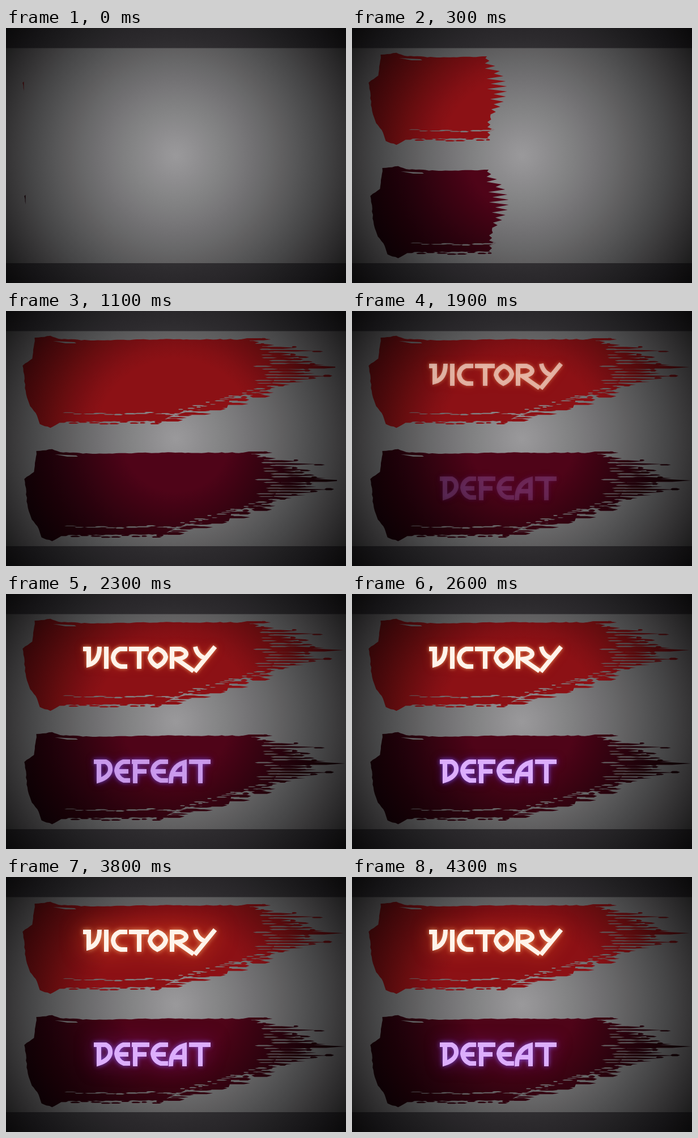
An HTML page with a canvas for the animation above (4.4 s loop, 600 px wide and 450 px high).

```html
<!DOCTYPE html>
<html lang="en">
<head>
<meta charset="utf-8">
<title>Victory / Defeat</title>
<style>
  html, body { margin: 0; width: 100%; height: 100%; overflow: hidden; background: #111; }
  canvas { display: block; }
</style>
</head>
<body>
<canvas id="stage" width="600" height="450" role="img" aria-label="VICTORY, DEFEAT"></canvas>
<script>
const ctx = document.getElementById('stage').getContext('2d');
const LOOP = 4400;
const RADIUS = 375;
const clamp = v => Math.max(0, Math.min(1, v));

let seed = 7;
function rand(a, b) {
  seed = (seed * 16807) % 2147483647;
  return a + (b - a) * seed / 2147483647;
}

// Each surface: colour in full light, how fast it darkens, brightest share of the colour
const PANEL = { rgb: [154, 153, 155], power: 1, cap: 1 };
const BARS = { rgb: [78, 75, 80], power: 1, cap: 1 };
const RED = { rgb: [225, 28, 34], power: 1.4, cap: .62 };
const WINE = { rgb: [120, 6, 37], power: 2.2, cap: .66 };

// Vignette around the stage centre, for drawing shifted by dx, dy
function vignette({ rgb, power, cap }, dx = 0, dy = 0) {
  const x = 300 - dx, y = 225 - dy;
  const g = ctx.createRadialGradient(x, y, 0, x, y, RADIUS);
  for (let u = 0; u <= 1; u += 1 / 16) {
    const light = 1 - .88 * u + .25 * u * (1 - u);
    const share = Math.min(cap, light ** power);
    g.addColorStop(u, `rgb(${rgb.map(c => c * share)})`);
  }
  return g;
}

// Tapered horizontal bristle mark
function addMark(path, x, y, length, h) {
  path.moveTo(x, y);
  path.lineTo(x + length * .2, y - h / 2);
  path.lineTo(x + length * .65, y - h / 2);
  path.lineTo(x + length, y);
  path.lineTo(x + length * .75, y + h / 2);
  path.lineTo(x + length * .15, y + h / 2);
  path.closePath();
}

// Closed outline through the points, with small bumps along each side
function addRough(path, points, bump) {
  points.forEach(([x0, y0], i) => {
    const [x1, y1] = points[(i + 1) % points.length];
    const parts = Math.ceil(Math.hypot(x1 - x0, y1 - y0) / 6);
    for (let k = 0; k < parts; k++) {
      const x = x0 + (x1 - x0) * k / parts + rand(-bump, bump);
      const y = y0 + (y1 - y0) * k / parts + rand(-bump, bump);
      i + k ? path.lineTo(x, y) : path.moveTo(x, y);
    }
  });
  path.closePath();
}

const brush = new Path2D();
const slits = new Path2D('M83 53 121 55 124 57 105 57Z');

addRough(brush, [[30, 96], [46, 84], [51, 47], [78, 44], [92, 49], [150, 52], [260, 50], [425, 50],
  [478, 75], [482, 105], [465, 138], [395, 154], [390, 171], [312, 177], [272, 194], [97, 196],
  [78, 206], [60, 200], [52, 180], [42, 168], [35, 147]], .7);

// Bristles of the tail, longest in the middle
for (let y = 50; y < 148; y += 5) {
  const tip = 592 - .05 * (y - 98) ** 2 - rand(0, 65);
  addMark(brush, 415, y, tip - 415, rand(3, 5.5));
  addMark(brush, tip - rand(5, 30), y + rand(-2, 2), rand(8, 22), rand(2, 4));
  addMark(slits, rand(435, 470), y + 2.5, rand(20, 45), rand(1, 2.2));
}
addMark(brush, 460, 99, 136, 5);

// Crumbs along the rising lower edge
for (let x = 262; x < 440; x += 8) {
  const y = 195 - (x - 262) * .28;
  addMark(brush, x, y + rand(-4, 3), rand(12, 46), rand(2, 5));
  addMark(slits, x + 10, y - rand(5, 14), rand(8, 22), rand(1, 2));
}
// Dry streaks near the straight lower edge
for (let x = 100; x < 265; x += 18) {
  addMark(slits, x, rand(179, 183), rand(12, 32), rand(1, 2.5));
  addMark(brush, x - 8, rand(195, 199), rand(10, 22), 2.5);
}

// Spiky wipe edge: height and distance behind the front
const spikes = [];
for (let y = 40; y < 212; y += 9) {
  spikes.push([y, Math.min(70, .025 * (y - 108) ** 2)], [y + 4.5, rand(45, 82)]);
}

function drawBrush(t, surface, dx, dy) {
  const front = t < 1400 ? 31.5 + 568 * (1 - Math.exp(-((t / 456) ** 1.4))) : 700;
  const depth = t < 600 ? t / 600 : clamp((1100 - t) / 500);
  ctx.save();
  ctx.translate(dx, dy);
  ctx.beginPath();
  ctx.moveTo(-5, 0);
  ctx.lineTo(front - depth * 70, 0);
  for (const [y, back] of spikes) ctx.lineTo(front - depth * back, y);
  ctx.lineTo(-5, 220);
  ctx.clip();
  ctx.fillStyle = vignette(surface, dx, dy);
  ctx.fill(brush);
  ctx.fillStyle = vignette(PANEL, dx, dy);
  ctx.fill(slits);
  ctx.restore();
}

// Angular lettering
const VICTORY = new Path2D(`M136 97H146V125Q165 120 165 93 M177 93V132
  M214 97H201Q190 101 189 112Q190 125 203 128H214 M217 97H252 M235 97V132
  M268 97Q255 103 254 113Q257 123 267 128Q281 121 282 111Q280 101 268 97Z
  M293 132V97H308Q318 100 318 106Q317 113 301 115L331 136 M334 93Q337 109 353 114 M369 93L333 137`);
const DEFEAT = new Path2D(`M155 296H176Q185 300 184 311Q182 323 164 329V296
  M219 296H207Q196 300 195 312Q197 325 208 329H219 M196 313H216
  M222 296H253 M228 296V334 M228 313H248
  M286 296H272Q260 300 259 312Q261 325 273 329H286 M260 313H282
  M291 334Q290 304 315 297V334 M291 318H316 M323 296H361 M343 296V334`);

function drawWord(path, alpha, color, glows) {
  const away = 2000;
  ctx.save();
  ctx.globalAlpha = alpha;
  ctx.lineWidth = 8;
  ctx.strokeStyle = color;
  // Only the shadow of a word drawn off the stage is seen
  ctx.translate(-away, 0);
  ctx.shadowOffsetX = away;
  for (const [tint, blur] of glows) {
    ctx.shadowColor = tint;
    ctx.shadowBlur = blur;
    ctx.stroke(path);
  }
  ctx.translate(away, 0);
  ctx.shadowColor = 'transparent';
  ctx.stroke(path);
  ctx.restore();
}

function draw(t) {
  ctx.fillStyle = vignette(BARS);
  ctx.fillRect(0, 0, 600, 450);
  ctx.fillStyle = vignette(PANEL);
  ctx.fillRect(0, 35.5, 600, 379.5);
  drawBrush(t, RED, 0, 0);
  drawBrush(t, WINE, 3, 200);

  const pulse = t < 2600 ? 0 : (1 - Math.cos((t - 2600) / 2400 * 2 * Math.PI)) / 2;
  drawWord(VICTORY, clamp((t - 1600) / 500), '#fff3ea', [
    [`rgba(255,90,30,${.3 + .5 * pulse})`, 18 + 22 * pulse],
    ['rgba(255,175,110,.8)', 6 + 4 * pulse]]);
  drawWord(DEFEAT, clamp((t - 1800) / 600), '#dcaefc', [
    [`rgba(${90 + 70 * pulse},30,${200 - 20 * pulse},.5)`, 16 + 18 * pulse],
    ['rgba(140,90,245,.8)', 7 + 2 * pulse]]);
}

// Motion advances in 100 ms steps, skipping some
function step(t) {
  const n = Math.floor(t / 100);
  return (n % 5 === 2 ? n - 1 : n) * 100;
}

const start = performance.now();
function tick() {
  draw(step((performance.now() - start) % LOOP));
  requestAnimationFrame(tick);
}
tick();
</script>
</body>
</html>
```
